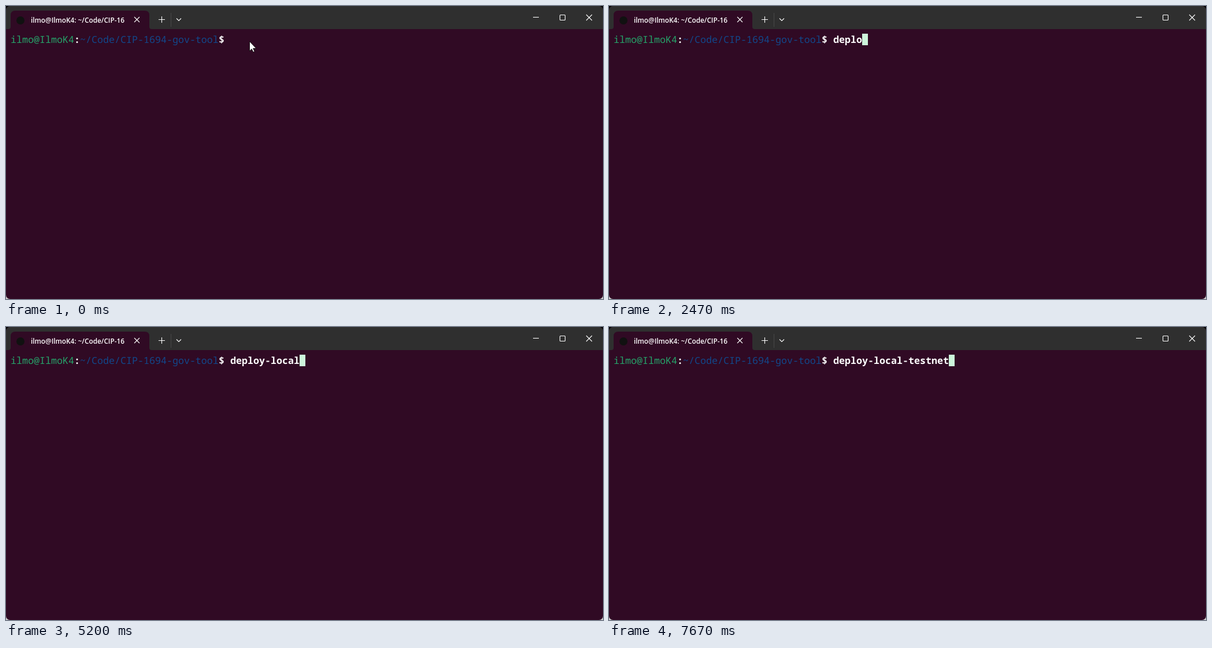
Animation of 1033 by 508 pixels, one loop 8000 ms. Source, as an HTML page:

```html
<!DOCTYPE html>
<html lang="en">
<head>
<meta charset="utf-8">
<title>Terminal</title>
<style>
  html, body { margin: 0; width: 100%; height: 100%; overflow: hidden; background: #000; }
  svg { display: block; }
  .mono { font: 500 16.667px "Noto Sans Mono", monospace; text-rendering: geometricPrecision; }
  .white { font-weight: 600; fill: #fff; }
  .title { font: 600 11.8px "Open Sans", "Noto Sans", sans-serif; fill: #fff; }
  .icons { fill: none; stroke: #fff; stroke-width: 1.1; }
</style>
</head>
<body>
<svg width="1033" height="508" viewBox="0 0 1033 508">
  <clipPath id="window"><rect width="1033" height="508" rx="7"/></clipPath>
  <clipPath id="label"><rect x="40" y="10" width="168" height="28"/></clipPath>
  <rect y="254" width="1033" height="254" fill="#ccc"/>
  <g clip-path="url(#window)">
    <rect width="1033" height="508" fill="#300a24"/>
    <rect width="1033" height="40" fill="#2f2f2f"/>
    <path d="M4 40q4 0 4-4V16q0-8 8-8h224q8 0 8 8v20q0 4 4 4z" fill="#300a24"/>
  </g>

  <circle cx="25" cy="25" r="7" fill="#111"/>
  <g clip-path="url(#label)"><text class="title" x="43" y="29">ilmo@IlmoK4: ~/Code/CIP-16</text></g>
  <path d="M285.5 12v24" stroke="#484848"/>
  <g class="icons">
    <path d="M222 19l9 9m0-9l-9 9"/>
    <path d="M264 23.5h11M269.5 18v11"/>
    <path d="M295 21.5l4 4 4-4"/>
    <path d="M912 19.5h10"/>
    <rect x="958.5" y="15.5" width="9" height="9" rx="1"/>
    <path d="M1004 15l10 10m0-10l-10 10"/>
  </g>

  <g class="mono">
    <text x="8" y="64" fill="#26a269">ilmo@IlmoK4</text>
    <text x="128" y="64" fill="#12488b">~/Code/CIP-1694-gov-tool</text>
    <g class="white">
      <text x="118" y="64">:</text>
      <text x="368" y="64">$</text>
      <text id="typed" x="388" y="64"></text>
    </g>
  </g>
  <rect id="cursor" y="48" width="10" height="20" fill="#cdf5db"/>
  <path id="pointer" d="M421.5 61.5v16.5l3.7-3.5 2.6 5.5 2.3-1-2.5-5.5h5.2z" fill="#fff" stroke="#000" stroke-width=".8"/>
</svg>
<script>
  const LOOP = 8000, START_X = 388, CELL = 10;
  const command = "deploy-local-testnet";
  const keyTimes = [1530, 1870, 2130, 2330, 2470, 2670, 3270, 3930, 4200, 4800,
                    5070, 5200, 6400, 6600, 6800, 6930, 7130, 7400, 7470, 7670];
  const cursorOff = [[0, 400], [930, 1530], [3870, 3930], [5730, 6330]];

  const [typed, cursor, pointer] = ["typed", "cursor", "pointer"].map(id => document.getElementById(id));
  const show = (el, on) => el.setAttribute("visibility", on ? "visible" : "hidden");

  function draw() {
    const t = performance.now() % LOOP;
    const count = keyTimes.filter(k => k <= t).length;
    typed.textContent = command.slice(0, count);
    cursor.setAttribute("x", START_X + count * CELL);
    show(cursor, !cursorOff.some(([from, to]) => t >= from && t < to));
    show(pointer, count === 0);
    requestAnimationFrame(draw);
  }
  draw();
</script>
</body>
</html>
```
